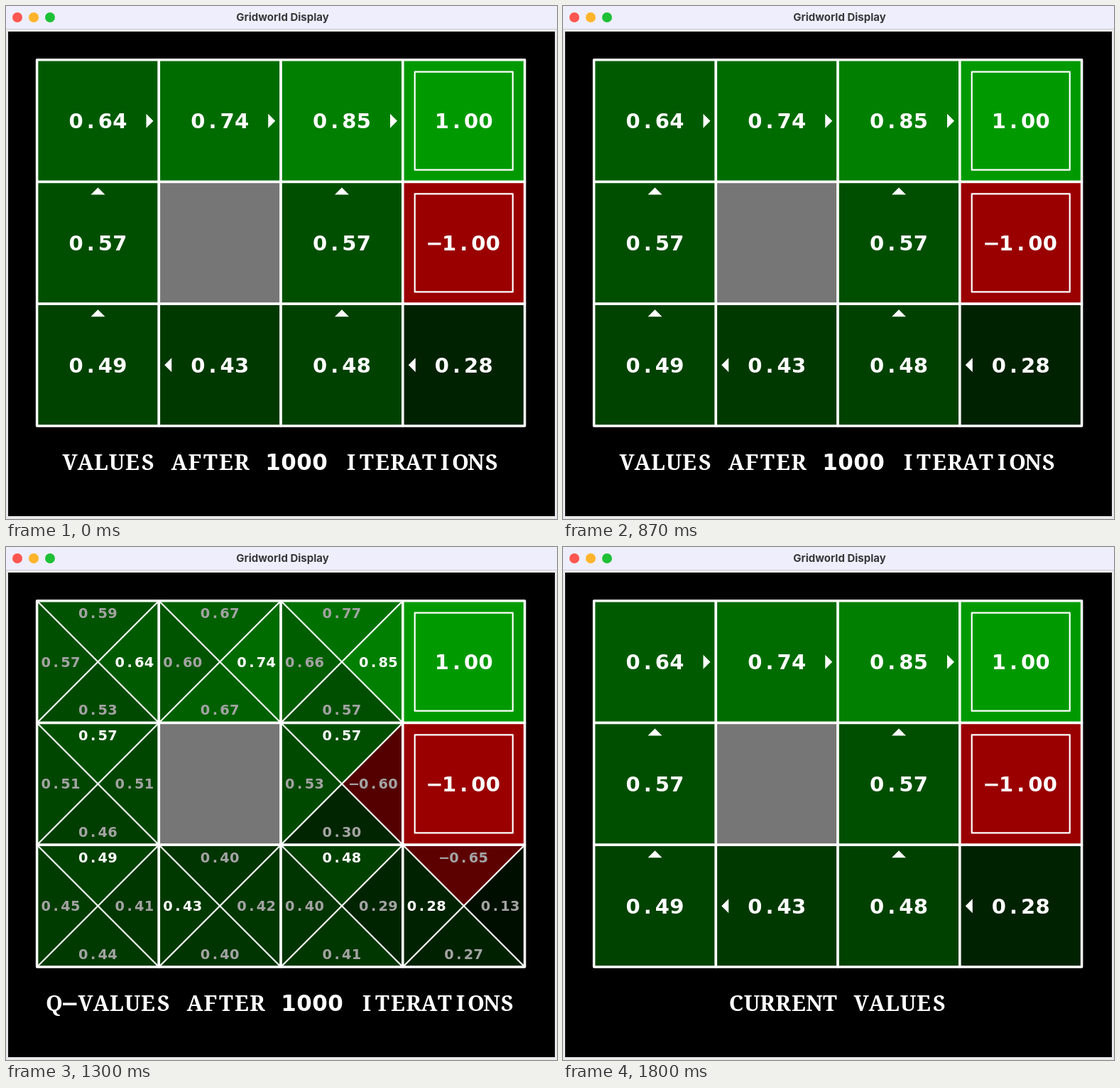
Recreate the animation shown at these times as an HTML page with a canvas. Size 776x722 px, loop 1830 ms.

```html
<!DOCTYPE html>
<html lang="en">
<head>
<meta charset="utf-8">
<title>Gridworld Display</title>
<style>
  html, body { margin: 0; width: 776px; height: 722px; overflow: hidden; background: #e9e9ec; }
  canvas { display: block; }
</style>
</head>
<body>
<canvas id="stage" width="776" height="722"></canvas>
<script>
const ctx = document.getElementById('stage').getContext('2d');
const LOOP = 1830, Q_START = 900, RUN_START = 1340;
const CELL = 171.75, LEFT = 44, TOP = 76;

// Q-values of each cell in the order north, east, south, west;
// a single number is an exit, null is a wall.
const grid = [
  [[.59, .64, .53, .57], [.67, .74, .67, .60], [.77, .85, .57, .66], 1],
  [[.57, .51, .46, .51], null, [.57, -.60, .30, .53], -1],
  [[.49, .41, .44, .45], [.40, .42, .40, .43], [.48, .29, .41, .40], [-.65, .13, .27, .28]]
];

// Agent's walk: start time, column, row; it leaves after the exit.
const walk = [[RUN_START, 0, 2], [1440, 0, 1], [1500, 0, 0], [1560, 1, 0], [1620, 2, 0], [1680, 3, 0]];
const WALK_END = 1740;

const centre = (col, row) => [LEFT + (col + .5) * CELL - .4, TOP + (row + .5) * CELL - .2];
const label = v => v.toFixed(2).replace('-', '\u2212');

function shade(v) {
  const level = Math.round(154 * Math.abs(v) ** 1.18);
  return v < 0 ? `rgb(${level},0,0)` : `rgb(0,${level},0)`;
}

// Fixed-pitch text, centred on x and y.
function mono(text, x, y, pitch, color = '#fff') {
  ctx.fillStyle = color;
  ctx.textAlign = 'center';
  ctx.textBaseline = 'alphabetic';
  [...text].forEach((ch, i) => {
    const letter = /[A-Z]/.test(ch);
    const size = pitch * (letter ? 1.38 : 1.41);
    ctx.font = `bold ${size}px ${letter ? '"Noto Serif", serif' : '"DejaVu Sans", sans-serif'}`;
    ctx.fillText(ch, x + (i - (text.length - 1) / 2) * pitch, y + size * .364);
  });
}

function polygon(points, color) {
  ctx.beginPath();
  points.forEach(p => ctx.lineTo(...p));
  ctx.closePath();
  ctx.fillStyle = color;
  ctx.fill();
}

function disc(x, y, r, color) {
  ctx.beginPath();
  ctx.arc(x, y, r, 0, 7);
  ctx.fillStyle = color;
  ctx.fill();
}

function outline(x, y, half, width) {
  ctx.strokeStyle = '#fff';
  ctx.lineWidth = width;
  ctx.lineJoin = 'round';
  ctx.strokeRect(x - half, y - half, 2 * half, 2 * half);
}

function drawWindow() {
  ctx.fillStyle = '#e9e9ec';
  ctx.fillRect(0, 0, 776, 722);
  ctx.fillStyle = '#eeeefc';
  ctx.fillRect(0, 0, 776, 32);
  ctx.fillStyle = '#d2d2d6';
  ctx.fillRect(0, 32, 776, 1);
  ctx.fillStyle = '#000';
  ctx.fillRect(3, 36, 770, 682);
  ['#fe5650', '#ffb42b', '#1fc036'].forEach((c, i) => disc(16 + 23 * i, 16, 7, c));
  ctx.fillStyle = '#38383c';
  ctx.font = 'bold 15px Inter, sans-serif';
  ctx.textAlign = 'center';
  ctx.textBaseline = 'alphabetic';
  ctx.fillText('Gridworld Display', 389.5, 20.5);
}

function drawArrow(x, y, dir) {
  ctx.save();
  ctx.translate(x, y);
  ctx.rotate(dir * Math.PI / 2);
  polygon([[0, -78], [10, -68], [-10, -68]], '#fff');
  ctx.restore();
}

function drawQ(x, y, q) {
  const h = CELL / 2, best = Math.max(...q);
  const corners = [[x - h, y - h], [x + h, y - h], [x + h, y + h], [x - h, y + h]];
  q.forEach((v, i) => polygon([corners[i], corners[(i + 1) % 4], [x, y]], shade(v)));
  ctx.strokeStyle = '#fff';
  ctx.lineWidth = 2.2;
  ctx.beginPath();
  for (const i of [0, 1]) {
    ctx.moveTo(...corners[i]);
    ctx.lineTo(...corners[i + 2]);
  }
  ctx.stroke();
  q.forEach((v, i) => {
    const text = label(v), pitch = 13.76, reach = 79 - text.length * pitch / 2;
    const dx = [0, reach, 0, -reach - 1][i], dy = [-68.3, 0, 67.7, 0][i];
    mono(text, x + dx, y + dy, pitch, v === best ? '#fff' : '#a3a3a3');
  });
}

function drawCell(cell, x, y, showQ, agentHere) {
  const h = CELL / 2, isExit = typeof cell === 'number';
  const value = isExit ? cell : cell && Math.max(...cell);
  ctx.fillStyle = cell ? shade(value) : '#767676';
  ctx.fillRect(x - h, y - h, CELL, CELL);
  if (cell && !isExit && showQ) drawQ(x, y, cell);
  else if (cell) {
    if (isExit) outline(x, y, 69, 2.2);
    else drawArrow(x, y, cell.indexOf(value));
    if (agentHere) disc(x - .9, y - .8, 18.7, '#00f');
    mono(label(value), x, y, 20.6);
  }
  outline(x, y, h, 3.5);
}

function draw(t) {
  const showQ = t >= Q_START && t < RUN_START;
  const step = t < WALK_END && walk.filter(s => s[0] <= t).pop();
  drawWindow();
  grid.forEach((cells, row) => cells.forEach((cell, col) =>
    drawCell(cell, ...centre(col, row), showQ, step && step[1] === col && step[2] === row)));
  const title = t < Q_START ? 'VALUES AFTER 1000 ITERATIONS'
    : showQ ? 'Q\u2212VALUES AFTER 1000 ITERATIONS' : 'CURRENT VALUES';
  mono(title, 387, 641.5, 22);
}

function frame() {
  draw(performance.now() % LOOP);
  requestAnimationFrame(frame);
}
frame();
</script>
</body>
</html>
```
